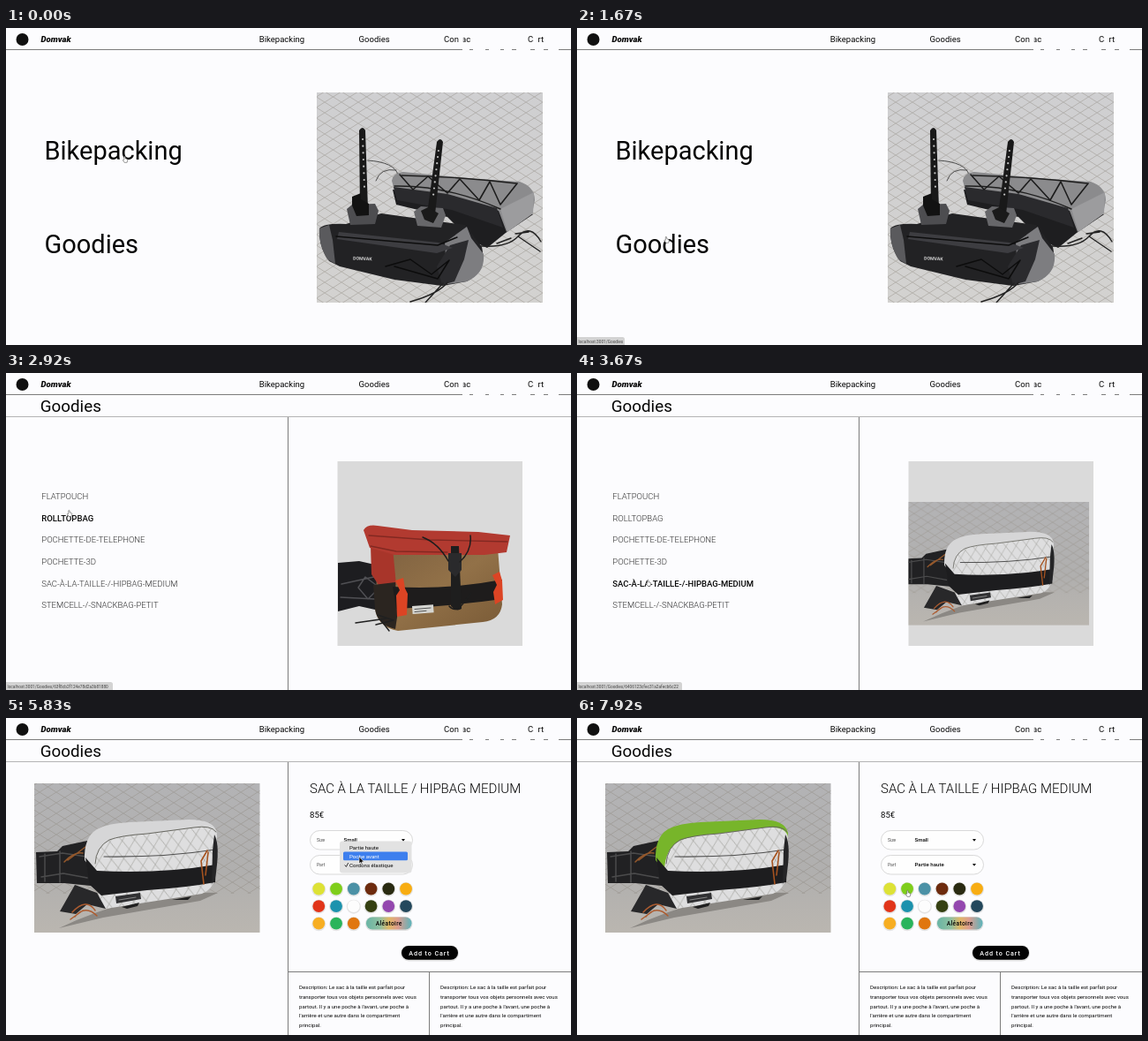
Animation, 640 px wide and 359 px high, one loop 8 s. Source, as an HTML page:

```html
<!DOCTYPE html>
<html lang="fr">
<head>
<meta charset="utf-8">
<title>Bike bags</title>
<style>
html, body { margin: 0; width: 100%; height: 100%; overflow: hidden; background: #fcfcfe; }
svg { display: block; width: 100%; height: 100%; }
text { font-family: Roboto, Arial, sans-serif; white-space: pre; }
</style>
</head>
<body>
<svg id="stage" viewBox="0 0 640 359"></svg>
<script>
const LOOP = 8000, SHOP_AT = 1710, ITEM_AT = 3900;
const PAPER = '#fcfcfe', LINE = '#7c7c7c', SOFT = '#dadada', INK = '#060606';

const text = (x, y, size, str, extra = '') =>
  `<text x="${x}" y="${y}" font-size="${size}" fill="${INK}" ${extra}>${str}</text>`;
const rect = (x, y, w, h, fill, extra = '') =>
  `<rect x="${x}" y="${y}" width="${w}" height="${h}" fill="${fill}" ${extra}/>`;
const path = (d, fill, extra = '') => `<path d="${d}" fill="${fill}" ${extra}/>`;
const stroke = (d, color, width = 1, extra = '') =>
  `<path d="${d}" fill="none" stroke="${color}" stroke-width="${width}" stroke-linecap="round" stroke-linejoin="round" ${extra}/>`;
const group = (id, body, extra = '') => `<g id="${id}" ${extra}>${body}</g>`;

const defs = `<defs>
  <pattern id="floor" width="19" height="12" patternUnits="userSpaceOnUse">
    <path d="M0 0L19 12M19 0L0 12" stroke="#8c857c" stroke-width=".7" opacity=".6"/></pattern>
  <pattern id="weave" width="14" height="20" patternUnits="userSpaceOnUse" patternTransform="rotate(-5)">
    <path d="M0 0L14 20M14 0L0 20" stroke="#95958f" stroke-width=".6"/></pattern>
  <linearGradient id="wall" x2="0" y2="1"><stop offset="0" stop-color="#cfcfd1"/><stop offset="1" stop-color="#d3d2d0"/></linearGradient>
  <linearGradient id="room" x2="0" y2="1"><stop offset="0" stop-color="#b3b3b5"/><stop offset=".6" stop-color="#b0afae"/><stop offset="1" stop-color="#bab6b0"/></linearGradient>
  <linearGradient id="tan" x2="1" y2="1"><stop offset="0" stop-color="#7d6040"/><stop offset=".5" stop-color="#927148"/><stop offset="1" stop-color="#795a36"/></linearGradient>
  <linearGradient id="mix"><stop offset="0" stop-color="#69b5a5"/><stop offset=".3" stop-color="#8fc0a0"/><stop offset=".5" stop-color="#e0b766"/><stop offset=".7" stop-color="#dd9c8e"/><stop offset="1" stop-color="#5cb4bb"/></linearGradient>
  <clipPath id="frame"><rect x="375.5" y="100" width="209.5" height="209"/></clipPath>
  <clipPath id="photo"><rect x="352" y="73" width="256" height="238"/></clipPath>
</defs>`;

function header() {
  let gaps = rect(512.8, 6, 5, 12, PAPER) + rect(526, 6, 5, 12, PAPER) + rect(597.5, 6, 5, 13, PAPER);
  for (const [x, w] of [[517, 8], [529, 14], [547, 13], [564, 9], [578, 16], [599, 10], [614, 12]])
    gaps += rect(x, 21, w, 6, PAPER);
  return rect(0, 24, 640, 1, LINE) +
    '<circle cx="18.5" cy="13" r="7" fill="#101010"/>' +
    text(39.5, 16, 9.6, 'Domvak', 'font-weight="800" font-style="italic"') +
    text(286.7, 15.7, 9.55, 'Bikepacking') + text(399.6, 15.7, 9.55, 'Goodies') +
    text(496, 15.7, 9.55, 'Contact') + text(591, 15.7, 9.55, 'Cart') + gaps;
}

function strap(x, top, lean, height) {
  let s = path(`M${x - 3} ${top + 3}Q${x + 1} ${top - 3} ${x + 4} ${top + 3}L${x + 4 + lean} ${top + height}H${x - 5 + lean}Z`, '#191919');
  for (let i = 0; i < 8; i++)
    s += `<circle cx="${x + .5 + lean * (i + 2) / 11}" cy="${top + 13 + i * height / 12}" r="1.1" fill="#c4c4c4"/>`;
  return s;
}

function bikeBags() {
  return rect(352, 73, 256, 238, 'url(#wall)') + rect(352, 73, 256, 238, 'url(#floor)') +
    '<g clip-path="url(#photo)">' +
    stroke('M410 150Q440 152 444 166M419 173Q424 158 442 161', '#4c4c4c', 1) +
    path('M438 183L442 200L500 214L526 240L545 249L566 232L597 211L560 191Z', '#1e1e20') +
    path('M437 173Q438 164 450 163L535 171L582 174Q599 180 599 195L596 210L567 231L558 207L500 191L440 184Z', '#8b8b8d') +
    path('M439 180L500 188L556 204L563 226L505 206L443 195Z', '#2a2a2d') +
    path('M560 205L598 186L597 210L568 231Z', '#9c9c9e') +
    stroke('M446 166L461 183L478 168L500 187L514 171L536 195L548 174L560 200L579 176', '#1c1c1c', 1.6) +
    stroke('M448 167Q510 168 578 176M440 179Q500 178 560 205', '#1e1e1e', 1.4) +
    stroke('M530 246Q566 251 580 236T606 242M580 236L605 253M577 233L592 231M556 244L572 238', '#222', 1.4) +
    path('M355 227Q360 221 385 222L425 210L520 223L539 248Q545 275 522 287L494 292L440 285L378 270L366 264Q354 248 355 227Z', '#222224') +
    path('M355 227L366 223L370 240L373 267L364 262Q354 246 355 227Z', '#5a5a5d') +
    path('M497 243L522 225L527 238L541 256Q543 278 522 287L500 290Z', '#7d7d80') +
    path('M503 246L524 240L519 262L508 287L494 291L488 270Z', '#2b2b2e') +
    path('M377 231L490 243L506 249L488 255L375 239Z', '#3d3d41') +
    stroke('M374 236L489 246L511 237', '#0d0d0d', 1.5) +
    stroke('M430 270L458 262L482 279L502 263L489 284L440 270', '#0c0c0c', 1.5) +
    stroke('M500 288Q490 301 458 310M495 289L475 311', '#222', 1.5) +
    text(393, 262.5, 5.2, 'DOMVAK', 'font-weight="700" style="fill:#d4d4d4" transform="rotate(2 393 263)"') +
    path('M386 205L392 200L418 199L422 207L418 222L390 223Z', '#4d4d50') +
    path('M462 208L470 202L495 204L498 212L493 226L466 224Z', '#67676a') +
    strap(403, 113, 3, 92) + strap(491, 126, -9, 85) +
    path('M392 191L402 187L402 194L411 199L411 212L397 213L392 201Z', '#121212') +
    path('M470 207L478 203L490 210L484 221L474 217Z', '#1a1a1a') +
    '</g>';
}

// Hip bag photo, 255 x 169, drawn in item page coordinates.
function hipBag(lid) {
  const front = 'M99 172Q100 148 116 139Q130 133 160 131L213 124Q238 122 239 136L237 182Q233 195 222 199L113 216L107 208Z';
  return rect(32, 74, 255.5, 169, 'url(#room)') + rect(32, 74, 255.5, 125, 'url(#floor)') +
    path('M60 238Q150 195 240 198L220 207L110 226Z', '#8b8884') +
    path('M34 152L58 151L64 145L92 139L102 170L96 190L66 187L35 187Z', '#212123') +
    stroke('M38 157L64 153L91 157M40 180L65 176L92 181M61 151L61 186M44 154V185', '#4b4b4c', 1.5) +
    stroke('M66 163Q77 151 87 153M70 161L90 146', '#94582c', 1.5) +
    `<path ${lid} d="M89 161Q88 135 103 126Q116 119 140 118L207 115Q236 115 239 130L237 160L150 165L105 181Z"/>` +
    path(front, '#dededf') + path(front, 'url(#weave)') +
    stroke('M101 165Q102 146 117 138Q130 133 160 131L213 124Q232 121 238 129', '#66665f', 1) +
    stroke('M111 157Q180 158 237 149', '#505050', 1.2) +
    path('M90 158L103 173Q173 177 238 166L237 186Q205 192 160 195L108 201L95 189Z', '#1d1d1f') +
    path('M236 132Q243 144 237 181L233 188L234 150Z', '#252527') +
    path('M124 202L152 198L153 205L125 210Z', '#303032') +
    stroke('M128 206L147 203', '#858585', 1.2) +
    stroke('M228 150L221 162L224 188M229 152L226 178', '#a5521f', 1.6) +
    path('M61 219L78 189L103 198L113 216L92 211L79 222Z', '#28282a') +
    path('M131 214L151 209L149 213L137 216ZM188 206L210 202L206 206Z', '#202020') +
    stroke('M75 220Q91 203 101 218M78 225Q90 211 103 224M73 228L87 218', '#ad5c30', 1.5);
}

function rollBag() {
  return path('M376 215L400 213L431 220L442 272L418 268L400 264L376 270Z', '#1d1d20') +
    stroke('M380 239L421 230M379 254L418 256M407 231L423 243L410 256L399 243Z', '#505054', 1.4) +
    path('M421 212L437 194L557 198L562 262Q560 280 540 282L444 292Q421 288 418 267Z', 'url(#tan)') +
    path('M413 196L438 198L442 240L424 243L414 228Z', '#a8352a') +
    path('M416 240L441 237L444 270L441 290Q420 285 418 267Z', '#2b2520') +
    path('M405 178Q409 171 421 173L460 178L535 180L571 184L567 203L542 206L440 206L412 198Z', '#b23a30') +
    stroke('M411 184L480 189L568 191M413 196L442 202L500 203', '#822821', 1.3) +
    path('M438 242Q500 246 562 234L562 256Q505 264 442 267Z', '#1e1c1c') +
    path('M504 196H513L516 267Q510 271 504 264Z', '#1e1e1e') +
    path('M501 204H516V223L509 231L501 223Z', '#2a2a2c') +
    stroke('M472 186Q490 193 501 213M526 184Q528 201 514 214M502 264Q509 272 517 262L527 249', '#1d1d1d', 1.5) +
    path('M441 235L450 232L452 244L455 250L454 274L443 276L442 252L446 246Z', '#dc4424') +
    path('M551 229L559 225L562 235L563 257L554 262L552 248L556 240Z', '#dc4424') +
    rect(460, 264, 24, 9, '#d6d6d2', 'transform="rotate(-4 460 264)"') +
    stroke('M463 267.5L481 266M463 270.5L476 269.3', '#555', 1) +
    stroke('M421 274L439 280L419 285M431 278L396 283M424 279L434 292', '#202020', 1.5);
}

const items = ['FLATPOUCH', 'ROLLTOPBAG', 'POCHETTE-DE-TELEPHONE', 'POCHETTE-3D',
  'SAC-À-LA-TAILLE-/-HIPBAG-MEDIUM', 'STEMCELL-/-SNACKBAG-PETIT'];
const rowY = i => 139.5 + 24.7 * i;

const home = bikeBags() + text(43.5, 149, 29, 'Bikepacking') + text(43.5, 255, 29, 'Goodies');

const title = rect(0, 49, 640, 1, '#b4b4b4') + rect(319, 50, 1, 309, LINE) + text(38.8, 43.7, 18.8, 'Goodies');

const shop = items.map((name, i) => text(40.3, rowY(i) + 3.4, 9.5, name, 'class="row"')).join('') +
  rect(375.5, 100, 209.5, 209, SOFT) +
  '<g clip-path="url(#frame)">' +
  group('hip', hipBag('fill="#d6d6d7"')) + group('roll', rollBag()) + '</g>';

const pill = (y, label, id, value) =>
  rect(344.5, y, 116, 21.5, '#fefefe', 'rx="10.75" stroke="#d9d9d9" stroke-width="1"') +
  text(352, y + 12.7, 5.1, label, 'font-weight="300"') +
  text(382.5, y + 12.8, 6.1, value, `id="${id}" font-weight="500"`) +
  path(`M448 ${y + 9.6}h4l-2 2.6z`, INK);

function swatches() {
  const colors = ['#dde236', '#7fce1b', '#4b91a6', '#6d2b0e', '#2a2b12', '#f8ad12',
    '#e1351a', '#1c92ad', '#fdfdfd', '#354012', '#9448af', '#24485c',
    '#f7ae22', '#29b45b', '#e0760f'];
  return colors.map((c, i) => {
    const x = 354.3 + 19.75 * (i % 6), y = 193.5 + 19.6 * Math.floor(i / 6);
    return `<circle cx="${x}" cy="${y + .6}" r="8" fill="#e4e4e4"/><circle cx="${x}" cy="${y}" r="6.9" fill="${c}"/>`;
  }).join('') +
    rect(407, 225, 53.5, 16, '#e0e0e0', 'rx="8"') + rect(408, 225.5, 51.5, 14, 'url(#mix)', 'rx="7"') +
    text(418.7, 235.2, 6.7, 'Aléatoire', 'font-weight="500" letter-spacing=".35"');
}

const about = ['Description: Le sac à la taille est parfait pour', 'transporter tous vos objets personnels avec vous',
  "partout. Il y a une poche à l'avant, une poche à", "l'arrière et une autre dans le compartiment", 'principal.'];
const column = x => about.map((s, i) => text(x, 307 + 10.75 * i, 6.1, s)).join('');

const parts = ['Partie haute', 'Poche avant', 'Cordons élastique'];
const menu = rect(378, 139.5, 81.5, 36, '#e2e2e2', 'rx="3"') +
  rect(382, 151.5, 73, 9.8, '#3d7fee', 'id="pick" rx="1.5"') +
  parts.map((p, i) => text(389, 148.8 + 10 * i, 6.15, p, 'class="option"')).join('') +
  stroke('M384 166.8L385.4 168.4L387.5 164.4', INK, .8);

const item = hipBag('id="lid"') +
  text(344, 85, 15, 'SAC À LA TAILLE / HIPBAG MEDIUM', 'font-weight="300"') +
  text(344, 113, 9.6, '85€') +
  pill(127.5, 'Size', 'size', 'Small') + pill(155.5, 'Part', 'part', parts[2]) + swatches() +
  rect(447, 257.5, 66, 18, '#e2e2e2', 'rx="9"') + rect(448, 258, 64, 15.8, '#030303', 'rx="7.9"') +
  text(456.3, 268.5, 7.2, 'Add to Cart', 'style="fill:#fff" font-weight="500" letter-spacing=".9"') +
  rect(320, 287, 320, 1, LINE) + rect(479, 287, 1, 72, LINE) + column(332) + column(492) +
  group('menu', menu);

const hand = path('M-1.6 -4.5Q-.7 -5.6 0 -4.4L.4 -1.6L3 -.8Q4 -.4 3.6 1.4L2.8 4.4H-1.2L-3.6 .8Q-3.4 -.4 -1.6 .4Z',
  '#fff', 'stroke="#555" stroke-width=".8" transform="scale(.75)"');
const arrow = path('M-2 -4V4L-.2 2.4L1 5L2.2 4.5L1 2L3.4 1.8Z', '#111', 'stroke="#fff" stroke-width=".6"');

const $ = id => document.getElementById(id);
const stage = $('stage');
stage.innerHTML = defs + rect(0, 0, 640, 359, PAPER) + group('home', home) +
  group('title', title) + group('shop', shop) + group('item', item) + header() +
  group('status', rect(-3, 350, 10, 12, '#d3d3d3', 'id="bar" rx="2.5"') + text(1.5, 356.6, 4.75, '', 'id="url" style="fill:#444"')) +
  group('cursor', group('hand', hand) + group('arrow', arrow));

const rows = [...stage.querySelectorAll('.row')], options = [...stage.querySelectorAll('.option')];
const show = (id, on) => $(id).setAttribute('display', on ? 'inline' : 'none');
const ease = u => u * u * (3 - 2 * u);

// Each key is [time, x, y].
function track(keys, t) {
  let a = keys[0];
  for (const b of keys) {
    if (t < b[0]) {
      const u = ease((t - a[0]) / (b[0] - a[0]));
      return [a[1] + (b[1] - a[1]) * u, a[2] + (b[2] - a[2]) * u];
    }
    a = b;
  }
  return [a[1], a[2]];
}

const mouse = [[0, 135, 149], [920, 128, 132], [1450, 104, 240], [1750, 101, 240], [2420, 87, 231],
  [2860, 72, 159], [3080, 72, 160], [3560, 81, 238], [3950, 81, 238], [4900, 402, 168],
  [5500, 402, 168], [5760, 402, 161], [5950, 402, 161], [6300, 402, 147], [6600, 402, 147], [7450, 375, 199]];
const drift = [[1750, 364, 140], [2420, 365, 136], [3300, 368, 140], [3600, 369, 146]];

function status(str, width) {
  show('status', !!str);
  $('url').textContent = str;
  $('bar').setAttribute('width', width + 3);
}

function draw(t) {
  const page = t < SHOP_AT ? 'home' : t < ITEM_AT ? 'shop' : 'item';
  const [x, y] = track(mouse, t);
  for (const p of ['home', 'shop', 'item']) show(p, p === page);
  show('title', page !== 'home');

  const over = Math.max(0, Math.min(5, Math.round((y - rowY(0)) / 24.7)));
  rows.forEach((r, i) => {
    r.setAttribute('font-weight', i === over ? 500 : 300);
    r.style.fill = i === over ? INK : '#2a2a2a';
  });
  const rolled = y < 200;
  show('hip', !rolled);
  show('roll', rolled);
  const [ix, iy] = track(drift, t);
  $('hip').setAttribute('transform', `translate(${ix} ${iy}) scale(.826) translate(-32 -74)`);

  const host = 'localhost:3001/';
  if (page === 'home')
    t < 500 ? status('', 0) : y < 165 ? status(host + 'Bikepacking', 64) : y > 225 ? status(host + 'Goodies', 54) : status('', 0);
  else if (t < 4330)
    status(host + 'Goodies/' + (rolled && page === 'shop' ? '63f8cb2f124e78d2a3b81880' : '6406123cfec31a2afecb6c22'), rolled ? 121 : 119);
  else status('', 0);

  const open = t >= 5450 && t < 6500;
  const hot = Math.max(0, Math.min(2, Math.round((y - 156.5) / 10) + 1));
  show('menu', open);
  $('pick').setAttribute('y', 141.5 + 10 * hot);
  options.forEach((o, i) => { o.style.fill = i === hot ? '#fff' : INK; });
  $('part').textContent = parts[t < 6500 ? 2 : 0];
  $('lid').setAttribute('fill', t < 7650 ? '#d6d6d7' : '#77b52a');

  const pointing = page !== 'item' || t < 4000 || t > 7200;
  show('hand', pointing);
  show('arrow', !pointing);
  $('cursor').setAttribute('transform', `translate(${x} ${y})`);
}

function tick(now) {
  draw(now % LOOP);
  requestAnimationFrame(tick);
}
draw(0);
requestAnimationFrame(tick);
</script>
</body>
</html>
```
